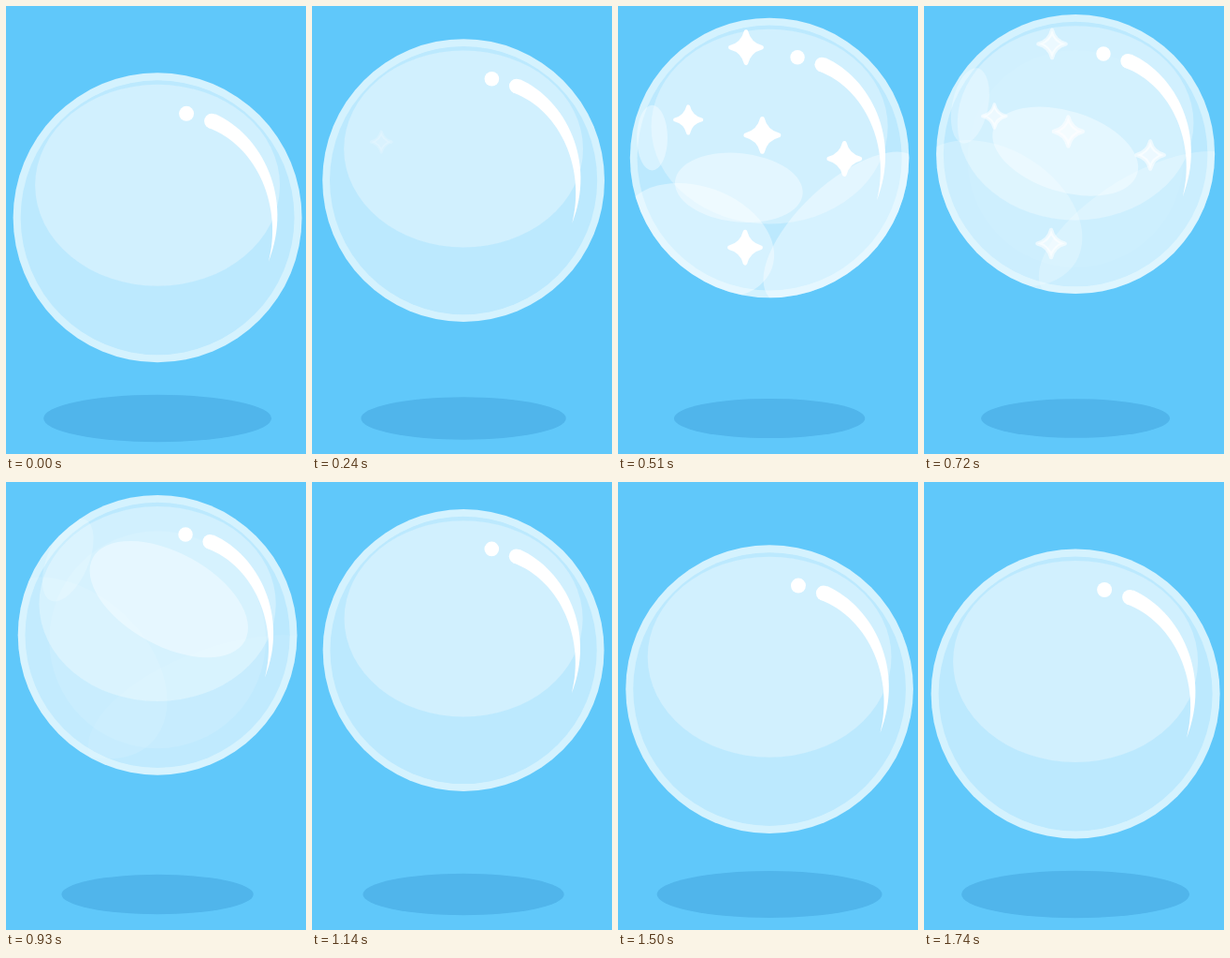
An HTML page with a canvas that plays this animation: 321 px wide and 478 px high, repeating every 1800 ms.

```html
<!DOCTYPE html>
<html lang="en">
<head>
<meta charset="utf-8">
<title>Floating bubble</title>
<style>
  html, body { margin: 0; width: 100%; height: 100%; overflow: hidden; background: #60c8fa; }
  canvas { display: block; }
</style>
</head>
<body>
<canvas id="stage" width="321" height="478"></canvas>
<script>
const c = document.getElementById('stage').getContext('2d');
const LOOP = 1800, X = 162.1, R = 154.5;

// Positions are relative to the bubble's centre
const sparkles = [
  { x: -90, y: -42, size: 17 },
  { x: -26, y: -122, size: 20 },
  { x: -8, y: -25, size: 21 },
  { x: 83, y: 1, size: 20 },
  { x: -27, y: 99, size: 20 }
];
const sheens = [
  { x: -80, y: 92, rx: 88, ry: 60, tilt: .35, end: .1 },
  { x: 82, y: 78, rx: 112, ry: 50, tilt: -.75, end: .06 },
  { x: -130, y: -22, rx: 17, ry: 36, tilt: 0, end: .2 },
  { x: -34, y: 33, rx: 71, ry: 38, tilt: .1, end: .38 }
];

const ramp = (t, a, b) => Math.min(1, Math.max(0, (t - a) / (b - a)));
const smooth = u => u * u * (3 - 2 * u);
const mix = (a, b, u) => a + (b - a) * u;

// Cubic Bezier easing with control points (x1, 0) and (x2, 1)
function ease(u, x1, x2) {
  let lo = 0, hi = 1;
  for (let i = 0; i < 20; i++) {
    const s = (lo + hi) / 2, v = 1 - s;
    if (3 * s * v * (v * x1 + s * x2) + s ** 3 < u) lo = s; else hi = s;
  }
  return smooth(lo);
}

// 0 = lowest, 1 = highest: decelerating rise, then a soft fall
function height(t) {
  return t < 690 ? 1 - (1 - ramp(t, 0, 675)) ** 2 : 1 - ease(ramp(t, 690, 1650), .56, .65);
}

function ellipse(x, y, rx, ry, color, tilt = 0) {
  c.fillStyle = color;
  c.beginPath();
  c.ellipse(x, y, rx, ry, tilt, 0, 2 * Math.PI);
  c.fill();
}

// Sheens turn with the bubble; those nearer the middle travel further
function drawSheens(t) {
  const fade = smooth(ramp(t, 320, 490)) * (1 - smooth(ramp(t, 920, 1150)));
  if (!fade) return;
  const u = smooth(ramp(t, 500, 940)), turn = .4 * u, grow = 1 + .35 * u;
  const cos = Math.cos(turn), sin = Math.sin(turn);
  c.save();
  c.beginPath();
  c.arc(0, 0, R, 0, 2 * Math.PI);
  c.clip();
  c.globalAlpha = fade * u * .1;
  ellipse(0, 5, 120, 120, '#fff');
  for (const { x, y, rx, ry, tilt, end } of sheens) {
    const drift = 82 * u * (1 - Math.hypot(x, y) / R);
    c.globalAlpha = fade * mix(.38, end, u);
    ellipse(x * cos - y * sin + drift, x * sin + y * cos - drift,
      rx * grow, ry * grow, '#fff', tilt + turn);
  }
  c.restore();
}

function drawSparkle(t, { x, y, size }, i) {
  const start = 210 + 30 * i;
  const p = ramp(t, start, start + 170) * (1 - ramp(t, 640, 840));
  if (!p) return;
  const r = size * mix(.62, .86, p), k = r * .2;
  c.save();
  c.translate(x, y);
  c.globalAlpha = p;
  c.fillStyle = c.strokeStyle = '#fff';
  c.lineWidth = r * .28;
  c.lineJoin = 'round';
  c.beginPath();
  c.moveTo(0, -r);
  for (let n = 0; n < 4; n++) {
    c.quadraticCurveTo(k, -k, r, 0);
    c.rotate(Math.PI / 2);
  }
  c.closePath();
  c.stroke();
  c.fill();
  c.restore();
}

function drawGlint() {
  ellipse(31, -111, 8, 8, '#fff');
  ellipse(58, -103, 8, 8, '#fff');
  c.beginPath();
  c.moveTo(62, -110.5);
  c.bezierCurveTo(112, -88, 146, -21, 119, 47);
  c.bezierCurveTo(134, -10, 108, -76, 54, -96);
  c.fill();
}

function draw(t) {
  const k = height(t), scale = 1 - 5.5 / R * k ** .8, shade = 122 - 21 * k;
  c.fillStyle = '#60c8fa';
  c.fillRect(0, 0, 321, 478);
  ellipse(X, 440, shade, shade * .2066, '#50b5eb');

  c.save();
  c.translate(X, 226 - 68 * k);
  c.scale(scale, scale);
  ellipse(0, 0, R, R, '#d4f2fe');
  ellipse(0, 0, 146.5, 146.5, '#bce9fe');
  ellipse(0, -34.5, 131, 107.5, '#d1f0fe');
  drawSheens(t);
  sparkles.forEach((s, i) => drawSparkle(t, s, i));
  drawGlint();
  c.restore();
}

function tick() {
  draw(performance.now() % LOOP);
  requestAnimationFrame(tick);
}
tick();
</script>
</body>
</html>
```
